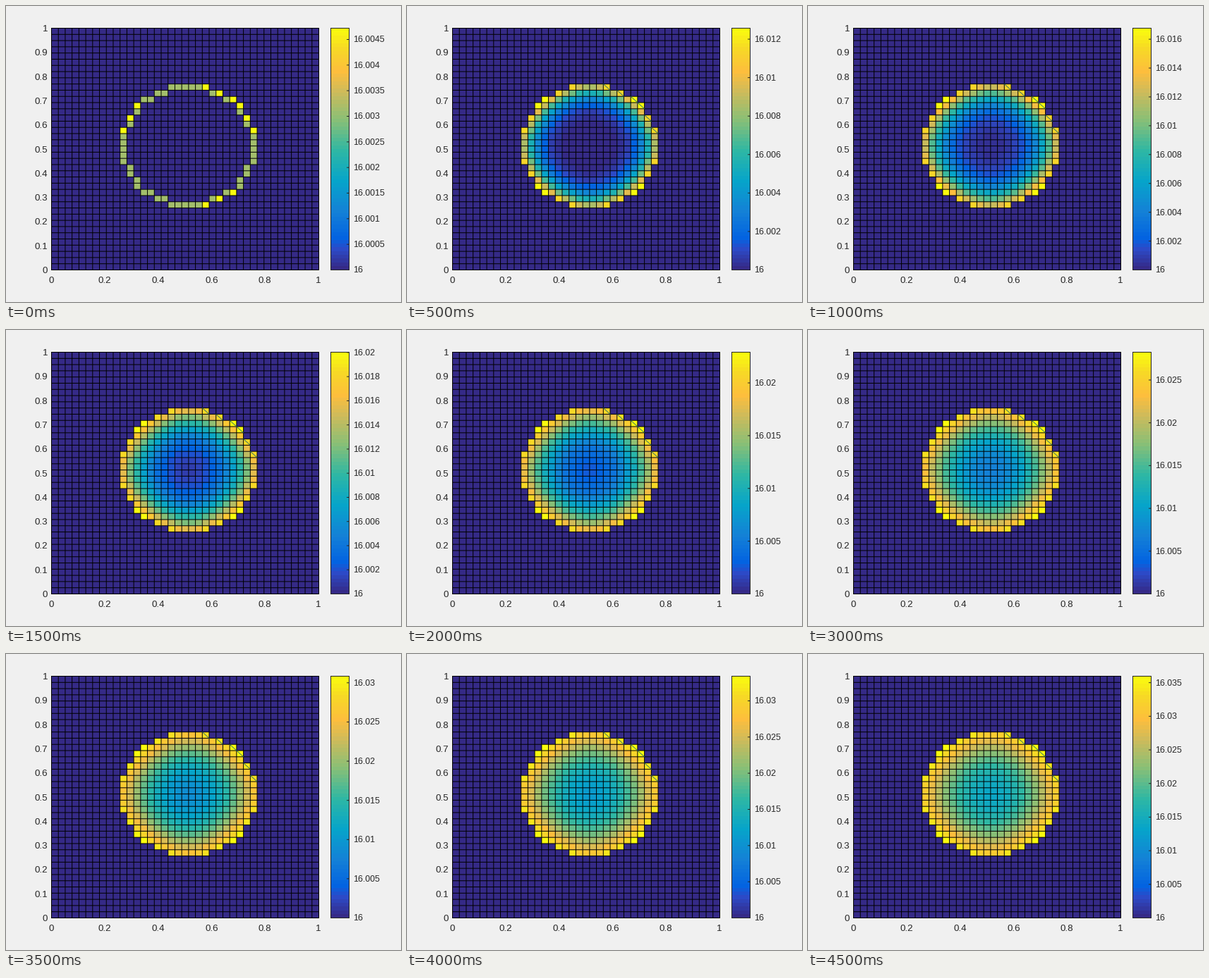
Animation, 560 px wide and 420 px high, one loop 5 s. Source, as a matplotlib script:

```python
import math

import numpy as np
import matplotlib.pyplot as plt
from matplotlib.animation import FuncAnimation
from matplotlib.collections import LineCollection
from matplotlib.colors import LinearSegmentedColormap

W, H, DPI = 560, 420, 100
PX = 72 / DPI
LEFT, RIGHT, TOP, BOTTOM = 64.5, 443.5, 31.5, 374.5
BAR_L, BAR_R = 460.5, 486.5
FRAMES = 10
NODES = 40
CELLS = NODES - 1
RADIUS = 10
GRADIENT = 0.003157
RATE = 0.05
INK = (0.15, 0.15, 0.15)

STOPS = [(0, "#352a87"), (5, "#2c4ac7"), (8, "#0363e1"), (15, "#1481d6"),
         (23, "#06a4ca"), (31, "#2eb7a4"), (39, "#87bf77"), (47, "#d1bb59"),
         (52, "#fdbe3d"), (58, "#f7d826"), (63, "#f9fb0e")]
CMAP = LinearSegmentedColormap.from_list("heat", [(p / 63, c) for p, c in STOPS], N=64)


def peak_at(n):
    """Hottest rise above 16: steady warming after a fast start."""
    return 0.01312 + 0.00254 * n - 0.0084 * math.exp(-n ** 0.82)


def tick_step(peak):
    return next(s for s in (5e-4, 1e-3, 2e-3, 5e-3) if peak / s < 10.5)


# Disc of nodes and its rim
off = np.arange(NODES) - CELLS / 2
disc = off[:, None] ** 2 + off[None, :] ** 2 <= RADIUS ** 2


def inward(i, j):
    """Neighbours facing the centre on each side that is open."""
    out = []
    di, dj = (-1 if off[i] > 0 else 1), (-1 if off[j] > 0 else 1)
    if not disc[i - di, j]:
        out.append((i + di, j))
    if not disc[i, j - dj]:
        out.append((i, j + dj))
    return out


rim = [(i, j, inward(i, j)) for i, j in np.argwhere(disc) if inward(i, j)]
inner = disc.copy()
for i, j, _ in rim:
    inner[i, j] = False


def heat_rim(t):
    for i, j, near in rim:
        t[i, j] = sum(t[n] for n in near) / len(near) + GRADIENT


def diffuse(t):
    lap = (np.roll(t, 1, 0) + np.roll(t, -1, 0)
           + np.roll(t, 1, 1) + np.roll(t, -1, 1) - 4 * t)
    t[inner] += RATE * lap[inner]


def solve():
    t = np.zeros((NODES, NODES))
    heat_rim(t)
    fields = []
    for n in range(FRAMES):
        while t.max() < peak_at(n):
            diffuse(t)
            heat_rim(t)
        fields.append(t[:CELLS, :CELLS].T.copy())
    return fields


FIELDS = solve()

fig = plt.figure(figsize=(W / DPI, H / DPI), dpi=DPI, facecolor=(240 / 255,) * 3)
ax = fig.add_axes([0, 0, 1, 1])
ax.set_xlim(0, W)
ax.set_ylim(H, 0)
ax.axis("off")


def label(x, y, s, size, ha):
    return ax.text(x, y, s, fontsize=size * PX, family="Liberation Sans",
                   color=INK, ha=ha, va="baseline")


def strokes(segs, color="black", width=1):
    lines = LineCollection(segs, colors=[color], linewidths=width * PX,
                           capstyle="projecting")
    lines.set_snap(False)
    ax.add_collection(lines)
    return lines


# Surface and its grid
gx = np.linspace(LEFT, RIGHT, NODES)
gy = np.linspace(BOTTOM, TOP, NODES)
mesh = ax.pcolormesh(gx, gy, FIELDS[0], cmap=CMAP, antialiased=False, linewidth=0)
strokes([[(x, TOP), (x, BOTTOM)] for x in gx]
        + [[(LEFT, y), (RIGHT, y)] for y in gy])

# Creases on the outward corners of the upper right rim
creases = strokes(
    [[(gx[i], gy[j + 1]), (gx[i + 1], gy[j])]
     for i, j, near in rim if len(near) == 2 and off[i] > 0 and off[j] > 0],
    color=(0.1, 0.4, 0.45), width=0.8)

for k in range(11):
    label(59.2, BOTTOM + 4.5 - k * (BOTTOM - TOP) / 10, f"{k / 10:g}", 13.33, "right")
for k in range(6):
    label(LEFT - 0.5 + k * (RIGHT - LEFT) / 5, 393, f"{k / 5:g}", 13.33, "center")

# Colour bar
ax.pcolormesh([BAR_L, BAR_R], np.linspace(BOTTOM, TOP, 65),
              np.arange(64)[:, None], cmap=CMAP, antialiased=False, linewidth=0)
strokes([[(BAR_L, TOP), (BAR_R, TOP), (BAR_R, BOTTOM), (BAR_L, BOTTOM),
          (BAR_L, TOP)]], color=INK)
ticks = strokes([], color=INK)
tick_labels = [label(492, 0, "", 12.4, "left") for _ in range(11)]


def draw(n):
    peak = peak_at(n)
    step = tick_step(peak)
    mesh.set_array(FIELDS[n])
    mesh.set_clim(0, peak)
    creases.set_visible(n > 0)
    marks = []
    for k, text in enumerate(tick_labels):
        v = k * step
        text.set_visible(v <= peak)
        if v <= peak:
            y = BOTTOM - v / peak * (BOTTOM - TOP)
            text.set_text(f"{16 + v:.6g}")
            text.set_y(y + 4)
            marks.append([(BAR_R - 3, y), (BAR_R, y)])
    ticks.set_segments(marks)
    return []


anim = FuncAnimation(fig, draw, frames=FRAMES, interval=500,
                     repeat=True, repeat_delay=0, blit=False)
plt.show()
```
